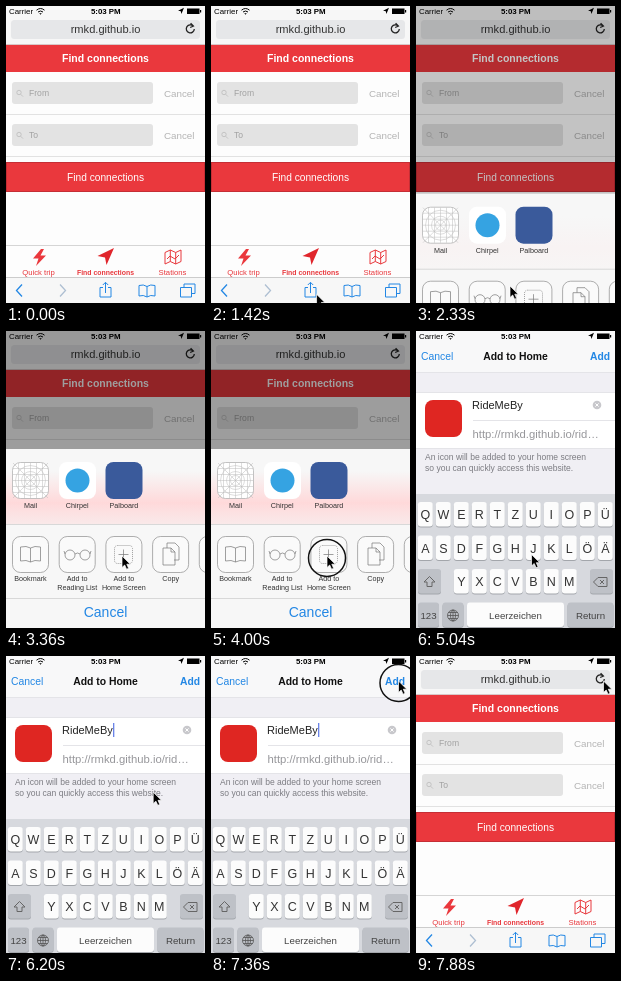
These frames come from a looping animation (199 by 297 pixels, 8000 ms). An HTML page:

```html
<!DOCTYPE html>
<html lang="en">
<head>
<meta charset="utf-8">
<title>Add to Home</title>
<style>
html, body { margin: 0; width: 100%; height: 100%; overflow: hidden; background: #fff; }
svg { display: block; width: 199px; height: 297px; font-family: "Liberation Sans", Arial, sans-serif; }
.mid { text-anchor: middle; }
.bold { font-weight: bold; }
.line { fill: none; stroke-width: 1; }
.red { fill: #ea383d; }
.hint { font-size: 8.6px; fill: #a2a2a2; }
.cancel { font-size: 9.8px; fill: #b4b4b4; }
.tab { font-size: 7.7px; fill: #e8383d; }
.blue { fill: #2387e4; }
.label { font-size: 7.2px; fill: #333; text-anchor: middle; }
.tile { fill: #fafafa; stroke: #8d8d8d; stroke-width: .7; }
.thin { fill: none; stroke: #777; stroke-width: .7; }
.key { font-size: 12.5px; fill: #333; text-anchor: middle; }
.word { font-size: 9.7px; fill: #444; text-anchor: middle; }
</style>
</head>
<body>
<svg viewBox="0 0 199 297">
  <defs>
    <linearGradient id="glow" x2="0" y2="1">
      <stop offset="0" stop-color="#ffd9da" stop-opacity="0"/>
      <stop offset=".6" stop-color="#ffd9da"/>
      <stop offset="1" stop-color="#fbdfe0" stop-opacity=".6"/>
    </linearGradient>
    <g id="row">
      <rect x="6" y="76" width="141" height="22" rx="3" fill="#e3e3e3"/>
      <circle cx="13" cy="86.5" r="2.2" class="line" stroke="#c4c4c4"/>
      <path d="M14.6 88.2l2.4 2.4" class="line" stroke="#c4c4c4"/>
      <text x="158" y="90.5" class="cancel">Cancel</text>
      <path d="M0 108.5H199" class="line" stroke="#e2e2e2"/>
    </g>
  </defs>

  <g id="page">
    <rect width="199" height="297" fill="#fdfdfd"/>
    <rect width="199" height="39" fill="#f7f7f7"/>
    <rect x="5" y="14" width="189" height="19" rx="3.5" fill="#e6e7e9"/>
    <text x="99.5" y="26.5" font-size="11.1" fill="#333" class="mid">rmkd.github.io</text>
    <path d="M187.3 20.2A4 4 0 1 0 188.3 23M184.6 17.2l2.8 2.9-3.2 1.4" class="line" stroke="#222" style="stroke-width:1.3"/>
    <path d="M0 38.5H199" class="line" stroke="#d8c8c8"/>
    <rect y="39" width="199" height="27" class="red"/>
    <text x="99.5" y="56" font-size="10.5" fill="#fff" class="mid bold">Find connections</text>
    <use href="#row"/>
    <text x="23" y="90" class="hint">From</text>
    <use href="#row" y="42"/>
    <text x="23" y="132" class="hint">To</text>
    <rect x=".5" y="156.5" width="198" height="29" class="red" stroke="#c52e35"/>
    <text x="99.5" y="174.5" font-size="10.2" fill="#fff" class="mid">Find connections</text>

    <path d="M0 239.5H199" class="line" stroke="#d5d5d5"/>
    <path d="M35 243l-8 9.5h5.5L30 260l10-10.5h-5.5L38 243z" class="red"/>
    <path d="M108 242l-16.5 8 7.5 1.5L100.5 259z" fill="#e0262c"/>
    <path d="M159 246.5l5.3-2.5 5.4 2.5 5.3-2.5v11.5l-5.3 2.5-5.4-2.5-5.3 2.5zM164.3 244v11.5M169.7 246.5v11.5M161 253l3-3 5 3 4-4" class="line" stroke="#e8383d"/>
    <g class="mid">
      <text x="32.5" y="269" class="tab">Quick trip</text>
      <text x="99.5" y="269" class="tab bold" style="font-size:6.9px">Find connections</text>
      <text x="166.5" y="269" class="tab">Stations</text>
    </g>
    <rect y="271" width="199" height="26" fill="#f7f7f7"/>
    <path d="M0 271.5H199" class="line" stroke="#ccc"/>
    <g class="line" stroke="#2387e4">
      <path d="M16 278.5l-5.5 6 5.5 6" stroke-width="1.3"/>
      <path d="M54 278.5l5.5 6-5.5 6" stroke="#aebfd2" stroke-width="1.3"/>
      <path d="M97 281.5h-3v9.5h11v-9.5h-3M99.5 287v-10.5M96.8 279l2.7-2.7 2.7 2.7"/>
      <path d="M141 280.5q-3.5-2.5-8-1v10.5q4.5-1.5 8 1 3.5-2.5 8-1v-10.5q-4.5-1.5-8 1v10.5"/>
      <path d="M174.5 281.5h11v9.5h-11zM178 281v-3h11v9.5h-3"/>
    </g>
  </g>

  <rect id="dim" width="199" height="297"/>

  <g id="share">
    <rect y="118" width="199" height="179" fill="#f7f7f7"/>
    <rect id="pink" y="140" width="199" height="53" fill="url(#glow)"/>
    <path d="M0 193.5H199M0 267.5H199" class="line" stroke="#d8d8d8"/>
    <rect x="6.5" y="131.5" width="36" height="36" rx="8" fill="#fff" stroke="#aaa" stroke-width=".7"/>
    <g class="thin" style="stroke:#bbb;stroke-width:.5">
      <path id="grid"/>
      <path d="M7 132l35 35M42 132l-35 35"/>
      <circle cx="24.5" cy="149.5" r="15"/>
      <circle cx="24.5" cy="149.5" r="9"/>
      <circle cx="24.5" cy="149.5" r="5"/>
    </g>
    <rect x="53" y="131" width="37" height="37" rx="8" fill="#fff"/>
    <circle cx="71.5" cy="149.5" r="12" fill="#35a3e2"/>
    <rect x="99.5" y="131" width="37" height="37" rx="8" fill="#3a5a9b"/>
    <g id="tiles"></g>
    <g class="thin">
      <path d="M24.5 217q-4-2.5-10-1v14q6-1.5 10 1 4-2.5 10-1v-14q-6-1.5-10 1v14"/>
      <circle cx="64" cy="224" r="5"/>
      <circle cx="79" cy="224" r="5"/>
      <path d="M69 223q2.5-2 5 0M59 223l-1-3M84 223l1-3"/>
      <rect x="108.5" y="214.5" width="18" height="18" rx="3" stroke-dasharray="1 1"/>
      <path d="M117.5 218.5v10M112.5 223.5h10"/>
      <path d="M161 217v-5h8l4 4v13h-5M157 217h8l4 4v13h-12zM165 217v4h4"/>
    </g>
    <text x="99.5" y="286" font-size="14" class="mid blue">Cancel</text>
  </g>

  <g id="add">
    <rect width="199" height="297" fill="#f0eff4"/>
    <rect width="199" height="41" fill="#f8f8f9"/>
    <path d="M0 41.5H199" class="line" stroke="#e4e4e8"/>
    <text x="5" y="29" font-size="10.4" class="blue">Cancel</text>
    <text x="99.5" y="29" font-size="10.4" class="mid bold" fill="#111">Add to Home</text>
    <text x="174" y="29" font-size="10.3" class="bold blue">Add</text>
    <rect y="61" width="199" height="56" fill="#fff"/>
    <path d="M0 61.5H199M57 89.5H199M0 117.5H199" class="line" stroke="#e4e4e8"/>
    <rect x="9" y="69" width="37" height="37" rx="8" fill="#df2622"/>
    <text id="name" x="56" y="78" font-size="11" fill="#222">RideMeBy</text>
    <path id="caret" d="M0 67v14" class="line" stroke="#3a5be0"/>
    <circle cx="181" cy="74" r="4.3" fill="#c8c8cc"/>
    <path d="M179.4 72.4l3.2 3.2M182.6 72.4l-3.2 3.2" class="line" stroke="#fff"/>
    <text x="56.5" y="106.5" font-size="11.3" fill="#96969a">http://rmkd.github.io/rid…</text>
    <g font-size="8.55" fill="#7c7c82">
      <text x="9" y="128.5">An icon will be added to your home screen</text>
      <text x="9" y="139.5">so you can quickly access this website.</text>
    </g>
    <rect y="163" width="199" height="134" fill="#d7d9de"/>
    <g id="keys"></g>
    <path d="M13.5 245.5l-5.5 5.5h3v4.5h5v-4.5h3z" class="line" stroke="#666"/>
    <path d="M182 246.5h9v9h-9l-4.5-4.5zM184 249l4 4M188 249l-4 4" class="line" stroke="#666"/>
    <g class="line" stroke="#555" style="stroke-width:.8">
      <circle cx="37" cy="284.5" r="5.5"/>
      <ellipse cx="37" cy="284.5" rx="2.5" ry="5.5"/>
      <path d="M31.5 284.5h11M37 279v11M32.5 281.5h9M32.5 287.5h9"/>
    </g>
  </g>

  <g id="status">
    <text x="3" y="8" font-size="7.9">Carrier</text>
    <path d="M30.5 4.2q4-3.4 8 0M32 6q2.5-2 5 0" class="line" stroke="#000"/>
    <path d="M33.2 7.2h2.6l-1.3 1.6zM181 2.5h12.5v5.5h-12.5zM194 4h1.2v2.5h-1.2zM178 1.8l-6 3 2.8.5.6 2.8z"/>
    <text x="99.8" y="8" font-size="7.9" class="mid bold">5:03 PM</text>
  </g>

  <circle id="ring" class="line" stroke="#111" style="stroke-width:1.5"/>
  <path id="cursor" d="M0 0V11.5L2.7 9 4.6 13.2 6.6 12.3 4.8 8.2H8.3Z" fill="#000" stroke="#fff" stroke-width=".7"/>
</svg>

<script>
const LOOP = 8000;
const el = id => document.getElementById(id);
const ease = (t, start, length) => {
  const p = Math.min(1, Math.max(0, (t - start) / length));
  return p * p * (3 - 2 * p);
};
const show = (id, on) => el(id).setAttribute('visibility', on ? 'visible' : 'hidden');
const move = (id, x, y) => el(id).setAttribute('transform', `translate(${x} ${y})`);

// Share sheet: icon grid, tiles and labels
let grid = '';
for (let i = 1; i < 6; i++) grid += `M${6.5 + i * 6} 132v35M7 ${131.5 + i * 6}h35`;
el('grid').setAttribute('d', grid);

const label = (i, y, text) => `<text class="label" x="${24.5 + i * 46.7}" y="${y}">${text}</text>`;
const actions = ['Bookmark', 'Add to|Reading List', 'Add to|Home Screen', 'Copy', ''];
el('tiles').innerHTML =
  ['Mail', 'Chirpel', 'Palboard'].map((s, i) => label(i, 177, s)).join('') +
  actions.map((s, i) =>
    `<rect class="tile" x="${6.5 + i * 46.7}" y="205.5" width="36" height="36" rx="8"/>` +
    s.split('|').map((part, n) => label(i, 250 + n * 8.5, part)).join('')).join('');

// Keyboard
function key(x, y, w, text, grey, cls = 'key') {
  const shape = `width="${w}" height="24.5" rx="3"`;
  return `<rect x="${x}" y="${y + 1}" ${shape} fill="#a3a6ab"/>` +
    `<rect x="${x}" y="${y}" ${shape} fill="${grey ? '#bec1c7' : '#fcfcfc'}"/>` +
    `<text class="${cls}" x="${x + w / 2}" y="${y + (cls === 'key' ? 17 : 16)}">${text}</text>`;
}
const letters = (text, x, y) => [...text].map((c, i) => key(x + i * 18, y, 15, c)).join('');
el('keys').innerHTML =
  letters('QWERTZUIOPÜ', 1.8, 171) + letters('ASDFGHJKLÖÄ', 1.8, 204.5) + letters('YXCVBNM', 37.8, 238) +
  key(2, 238, 23, '', true) + key(174, 238, 23, '', true) +
  key(2, 271.5, 21, '123', true, 'word') + key(26.5, 271.5, 21, '', true) +
  key(51, 271.5, 97, 'Leerzeichen', false, 'word') + key(151.5, 271.5, 46, 'Return', true, 'word');

// Pointer path: start, duration, end position
const moves = [[1030, 700, 94, 280], [2500, 650, 116, 225], [4450, 400, 115.5, 223.5], [5810, 850, 187.5, 25]];
const clicks = [1940, 3750, 7230];

function draw(t) {
  const share = ease(t, 2130, 350) - ease(t, 4000, 380);
  const add = ease(t, 4146, 400) - ease(t, 7520, 340);
  el('dim').setAttribute('opacity', 0.38 * share);
  el('pink').setAttribute('opacity', share ** 4);
  move('share', 0, 179 * (1 - share));
  move('add', 0, 297 * (1 - add));
  show('share', share > 0);
  show('add', add > 0);
  show('caret', add > 0 && (t - 4360) % 1200 < 650);

  let x = 122, y = 300;
  for (const [start, length, toX, toY] of moves) {
    const p = ease(t, start, length);
    x += (toX - x) * p;
    y += (toY - y) * p;
  }
  move('cursor', x, y);
  show('cursor', t >= 1030);

  const click = clicks.find(c => t >= c && t < c + 260);
  show('ring', click !== undefined);
  if (click !== undefined) {
    move('ring', x, y + 2);
    el('ring').setAttribute('r', 8 + 10.5 * ease(t, click, 120));
  }
}

move('caret', 57 + el('name').getComputedTextLength(), 0);

const begin = performance.now();
function tick() {
  draw((performance.now() - begin) % LOOP);
  requestAnimationFrame(tick);
}
tick();
</script>
</body>
</html>
```
